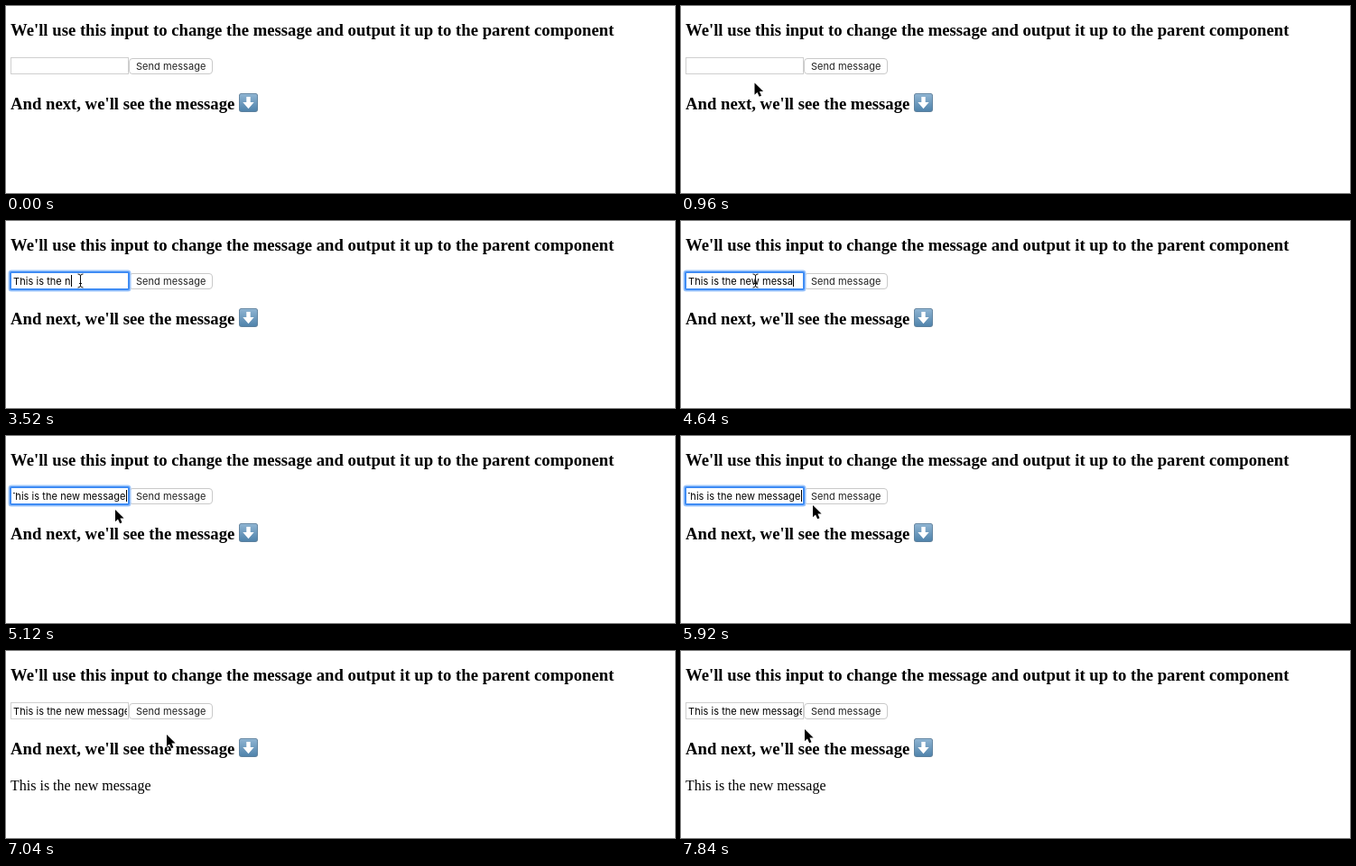
Write an HTML page that moves like this. It is 741x208 px and loops after 8000 ms.

```html
<!DOCTYPE html>
<html lang="en">
<head>
<meta charset="utf-8">
<title>Send message</title>
<style>
html, body { margin: 0; width: 100%; height: 100%; overflow: hidden; background: #fff; }
svg { display: block; }
h3, .serif { font-family: "Liberation Serif", Times, serif; }
.head { font-size: 18.72px; font-weight: bold; }
.ui { font: 11px Inter, "Open Sans", sans-serif; letter-spacing: .05px; white-space: pre; }
</style>
</head>
<body>
<svg width="741" height="208" viewBox="0 0 741 208">
  <defs>
    <linearGradient id="tile" x2="0" y2="1">
      <stop stop-color="#8fb4d2"/><stop offset="1" stop-color="#4f83ab"/>
    </linearGradient>
    <linearGradient id="blue" x2="0" y2="1">
      <stop stop-color="#4a94f8"/><stop offset="1" stop-color="#0b5fe6"/>
    </linearGradient>
    <clipPath id="field"><rect x="8" y="58" width="126" height="18"/></clipPath>
  </defs>

  <text class="serif head" x="5" y="33">We'll use this input to change the message and output it up to the parent component</text>
  <text class="serif head" x="5" y="115">And next, we'll see the message</text>
  <rect x="258" y="97" width="21" height="21" rx="3" fill="#5f7f99"/>
  <rect x="258.8" y="97.8" width="19.4" height="19.4" rx="2.4" fill="url(#tile)"/>
  <path d="M266.3 101h4.4v6h4l-6.2 7.2-6.2-7.2h4z" fill="#fff"/>
  <text id="output" class="serif" font-size="16" x="5" y="155">This is the new message</text>

  <rect id="button" x="136.5" y="58.5" width="92" height="17" rx="3.5"/>
  <text class="ui" x="144" y="71" fill="#222">Send message</text>
  <rect x="5.5" y="57.5" width="130" height="18" fill="#fff" stroke="#cfcfcf"/>
  <g id="focus" fill="none">
    <rect x="4" y="56" width="133" height="21" rx="2" stroke="#9cc5fb" stroke-width="3"/>
    <rect x="5" y="57" width="131" height="19" rx="1" stroke="#3f8cf4" stroke-width="2"/>
  </g>
  <g clip-path="url(#field)">
    <text id="typed" class="ui" y="71"></text>
    <rect id="caret" y="60" width="1" height="13"/>
  </g>

  <circle id="ring" r="16.5" fill="none" stroke="#111"/>
  <path id="arrow" d="M0 0V13.2L3 10.4 5.2 15.3 7.5 14.3 5.4 9.5H9.6Z" stroke="#fff" stroke-width="1.2" paint-order="stroke"/>
  <path id="beam" d="M-3-7.5Q0-7.5 0-5.5Q0-7.5 3-7.5M0-5.5V5.5M-3 7.5Q0 7.5 0 5.5Q0 7.5 3 7.5M-1.5 3H1.5" fill="none" stroke="#111"/>
</svg>
<script>
const STEP = 160, LOOP = 8000, MESSAGE = "This is the new message";

// [step, characters typed]
const typing = [[0, 0], [12, 3], [13, 5], [14, 6], [15, 8], [18, 9], [19, 10], [20, 11], [21, 12],
  [22, 13], [23, 15], [24, 17], [25, 19], [26, 20], [29, 21], [30, 23]];

// [step, pointer shape, x, y]
const pointer = [[0, ""], [1, "arrow", 602, 84], [2, ""], [5, "arrow", 88, 109], [6, "arrow", 81.5, 85.5],
  [7, "beam", 82.5, 66.5], [31, "beam", 104, 71], [32, "arrow", 121, 82], [33, "arrow", 122, 82],
  [34, "arrow", 121.5, 82], [36, "arrow", 132, 81], [37, "arrow", 146, 77], [38, "arrow", 161, 69.5],
  [43, "arrow", 171, 77], [44, "arrow", 178, 93], [45, "arrow", 169, 106], [46, "arrow", 150, 104],
  [47, "arrow", 133, 97], [48, "arrow", 127.5, 91], [49, "arrow", 137, 87]];

const $ = id => document.getElementById(id);
const show = (id, on) => $(id).style.display = on ? "" : "none";
const latest = (track, step) => track.findLast(key => key[0] <= step);
const place = (id, x, y) => $(id).setAttribute("transform", `translate(${x} ${y})`);

function draw(now) {
  const step = Math.floor(now % LOOP / STEP);
  const focused = step >= 7 && step < 39, pressed = step === 39;

  const typed = $("typed");
  typed.textContent = MESSAGE.slice(0, latest(typing, step)[1]);
  const width = typed.textContent ? typed.getComputedTextLength() : 0;
  const left = focused ? Math.min(8, 132.5 - width) : 8;
  typed.setAttribute("x", left);
  $("caret").setAttribute("x", Math.round(left + width));
  show("caret", focused && step !== 10 && step !== 11 && step !== 35);
  show("focus", focused);

  $("button").setAttribute("fill", pressed ? "url(#blue)" : "#fff");
  $("button").setAttribute("stroke", pressed ? "#2a74e4" : "#c9c9c9");
  show("output", step >= 40);

  const [, shape, x, y] = latest(pointer, step);
  for (const id of ["arrow", "beam"]) show(id, id === shape);
  if (shape) place(shape, x, y);
  show("ring", step === 7 || pressed);
  if (shape === "beam") place("ring", x, y);
  else if (shape) place("ring", x + 3, y + 7);

  requestAnimationFrame(draw);
}
requestAnimationFrame(draw);
</script>
</body>
</html>
```
